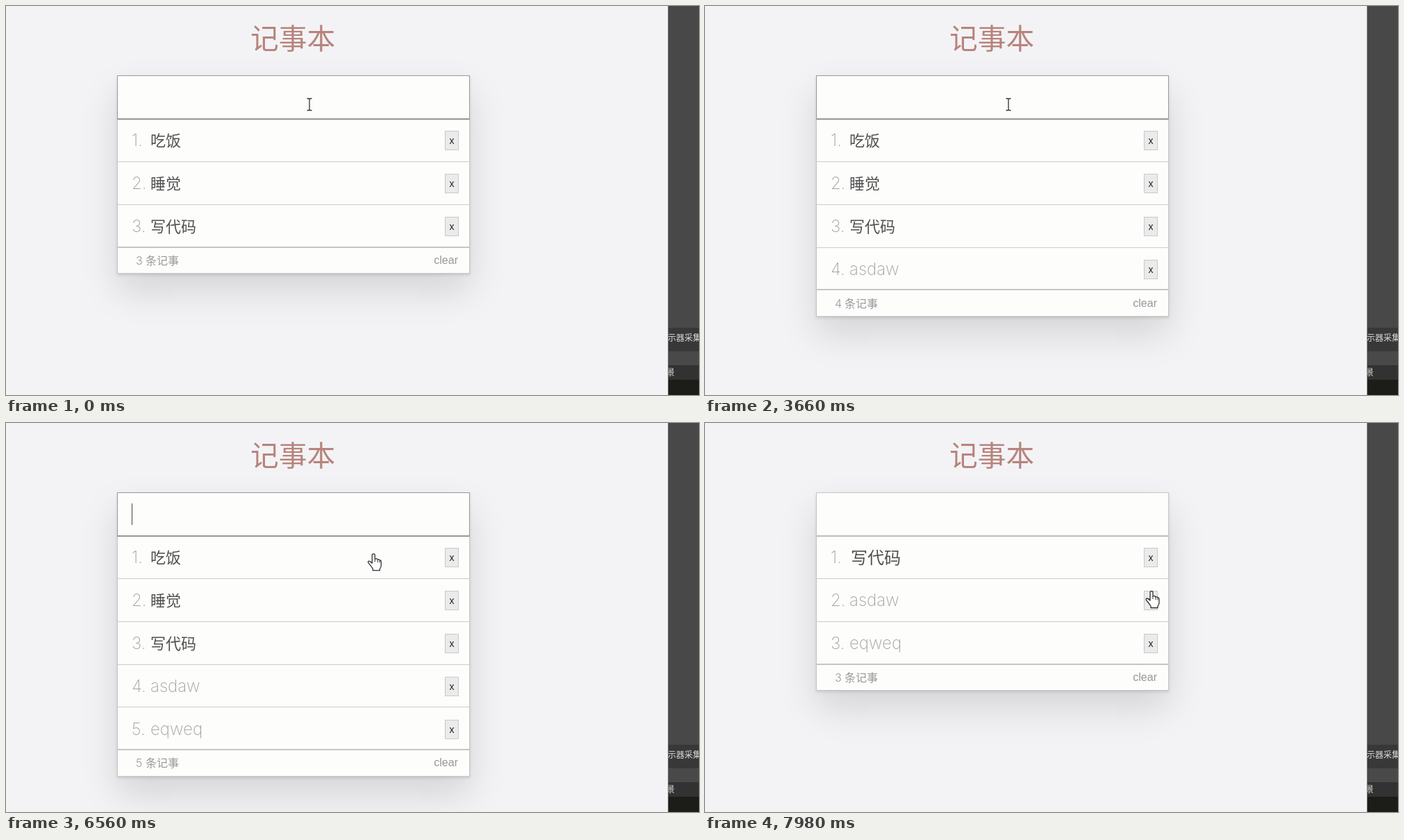
An HTML page that plays this animation: 998x561 px, repeating every 8 s.

```html
<!DOCTYPE html>
<html lang="zh-CN">
<head>
<meta charset="utf-8">
<title>记事本</title>
<style>
html, body { margin: 0; width: 100%; height: 100%; overflow: hidden; background: #f3f3f6; }
body { position: relative; font-family: "Liberation Sans", "Noto Sans CJK SC", "Noto Sans CJK", sans-serif; }
body *, .card * { position: absolute; box-sizing: border-box; white-space: pre; }
.cjk { font-family: "Noto Sans CJK SC", "Noto Sans CJK", sans-serif; font-weight: 100; }
h1 { margin: 0; left: 352px; top: 15px; font-size: 40.7px; line-height: 60px; color: #b8837c; }
.card { left: 160px; top: 100px; width: 508px; background: #fdfdfc; border: 1px solid #c6c6c6;
  box-shadow: 0 2px 4px rgba(0,0,0,.12), 0 25px 50px rgba(0,0,0,.13); }
.input { left: 160px; top: 100px; width: 508px; height: 64px; border: 1px solid; border-bottom-width: 2px;
  padding-left: 20px; font-size: 26px; line-height: 62px; color: #5c5c5c; }
.caret { top: 116px; width: 1px; height: 31px; background: #444; }
.row { left: 161px; width: 506px; height: 61.8px; border-bottom: 1px solid #cbcbd0; line-height: 61px; }
.row.last { border-bottom: 2px solid #c6c6c4; }
.num, .label { font: 200 24px/61px Inter, "Liberation Sans", sans-serif; color: #a4a4a4; }
.num { left: 20px; }
.label { left: 47px; }
.label.cjk { font-family: "Noto Sans CJK SC", "Noto Sans CJK", sans-serif; font-weight: 100; color: #505050; top: -1px; }
.del { left: 471px; top: 17px; width: 20px; height: 28px; background: #ebebeb; border: 1px solid #c9c9c9;
  font-size: 14px; line-height: 26px; text-align: center; color: #222; }
.foot { left: 160px; width: 508px; height: 37px; font-size: 16px; line-height: 36px; color: #999; }
.count { left: 27px; font: 300 16px/36px Inter, "Liberation Sans", sans-serif; }
.unit { left: 41px; font-size: 16px; font-weight: 300; top: -1px; }
.clear { right: 17px; }
.side { left: 953px; top: 0; width: 45px; height: 561px; overflow: hidden; border-left: 1px solid #85857f;
  background: linear-gradient(#484848 464px, #383838 464px 498px, #494949 498px 518px, #323232 518px 539px, #1c1c18 539px); }
.side span { left: -1px; font: 12px/20px "Noto Sans CJK SC", "Noto Sans CJK", sans-serif; color: #ddd; }
svg { left: 0; top: 0; overflow: visible; }
</style>
</head>
<body>
<h1 class="cjk">记事本</h1>
<div class="card"></div>
<div id="rows"></div>
<div class="input"></div>
<div class="caret"></div>
<div class="foot"><span class="count"></span><span class="unit cjk">条记事</span><span class="clear">clear</span></div>
<div class="side"><span style="top:468px">示器采集</span><span style="top:518px;left:-3px">景</span></div>
<svg id="beam" width="10" height="20">
  <path d="M-3.5-8.5H-1L0-7.5 1-8.5H3.5M0-7.5V7.5M-3.5 8.5H-1L0 7.5 1 8.5H3.5" fill="none" stroke="#333" stroke-width="1.3"/>
</svg>
<svg id="hand" width="20" height="26">
  <path d="M-2 1.5Q-2-.5 0-.5T2 1.5V7Q5 5.5 6 8Q8 6.7 9 9Q11 8.3 11 11V16Q11 19 9 21V23.5H-1V21Q-3 18-5 15.5L-7.5 12.5Q-8.5 10.5-6.5 10Q-5 10-2 13Z"
    fill="#fff" stroke="#333" stroke-width="1.3" stroke-linejoin="round"/>
  <path d="M2 7V11M6 8V12M9 9V12.5" stroke="#333" fill="none"/>
</svg>
<script>
const LOOP = 8000, ROW = 61.8, TOP = 163.3, BLINK = 530;
const $ = s => document.querySelector(s);
const card = $('.card'), input = $('.input'), caret = $('.caret'), foot = $('.foot'), count = $('.count');
const beam = $('#beam'), hand = $('#hand');

const blur = 7080;
const typed = [
  { text: 'asdaw', keys: [1720, 1860, 2000, 2160, 2320], enter: 2980 },
  { text: 'eqweq', keys: [4060, 4240, 4400, 4580, 4760], enter: 5500 }
];
const notes = [
  { text: '吃饭', from: 0, to: 7760 },
  { text: '睡觉', from: 0, to: 7140 },
  { text: '写代码', from: 0, to: LOOP, grows: 7140 },
  ...typed.map(w => ({ text: w.text, from: w.enter, to: LOOP }))
];
const resets = [40, ...typed.flatMap(w => [...w.keys, w.enter])];
const path = [[6160, 437, 142], [6560, 529, 189], [6960, 643, 256], [7200, 643, 256],
  [7400, 643, 218], [7560, 643, 190], [7820, 643, 190], [7970, 643, 243], [LOOP, 643, 243]];

const rows = notes.map(() => {
  const row = document.createElement('div');
  row.innerHTML = '<span class="num"></span><span class="label"></span><span class="del">x</span>';
  $('#rows').append(row);
  return row;
});

function pointer(t) {
  if (t <= path[0][0]) return path[0].slice(1);
  const i = path.findIndex(p => p[0] >= t);
  const [t0, x0, y0] = path[i - 1], [t1, x1, y1] = path[i];
  const k = (t - t0) / (t1 - t0);
  return [x0 + (x1 - x0) * k, y0 + (y1 - y0) * k];
}

function drawList(t) {
  const live = notes.filter(n => t >= n.from && t < n.to);
  rows.forEach((row, i) => {
    const note = live[i];
    row.style.display = note ? '' : 'none';
    if (!note) return;
    const [num, label] = row.children;
    const cjk = note.text.charCodeAt(0) > 255, big = t >= note.grows;
    row.className = i === live.length - 1 ? 'row last' : 'row';
    row.style.top = TOP + i * ROW + 'px';
    num.textContent = i + 1 + '.';
    label.textContent = note.text;
    label.className = cjk ? 'label cjk' : 'label';
    label.style.fontSize = cjk ? (big ? '24px' : '22px') : '';
    label.style.left = big ? '49px' : '';
  });
  const bottom = TOP + live.length * ROW;
  card.style.height = bottom - 100 + 37.2 + 'px';
  foot.style.top = bottom + 'px';
  count.textContent = live.length;
}

const pen = document.createElement('canvas').getContext('2d');
pen.font = '26px "Liberation Sans", sans-serif';

function drawInput(t) {
  const word = typed.find(w => t >= w.keys[0] && t < w.enter);
  const text = word ? word.text.slice(0, word.keys.filter(k => k <= t).length) : '';
  const since = t - Math.max(-Infinity, ...resets.filter(r => r <= t));
  const focused = t < blur;
  input.textContent = text;
  input.style.borderColor = focused ? '#999 #999 #969692' : '#c6c6c6 #c6c6c6 #bdbdbb';
  caret.style.left = 181 + Math.round(pen.measureText(text).width) + 'px';
  caret.style.display = focused && t >= resets[0] && since % (2 * BLINK) < BLINK ? '' : 'none';
}

function drawPointer(t) {
  const [x, y] = pointer(t), overList = y > TOP;
  beam.style.display = overList ? 'none' : '';
  hand.style.display = overList ? '' : 'none';
  (overList ? hand : beam).style.transform = `translate(${x}px, ${y}px)`;
}

const start = performance.now();
function frame() {
  const t = (performance.now() - start) % LOOP;
  drawList(t);
  drawInput(t);
  drawPointer(t);
  requestAnimationFrame(frame);
}
frame();
</script>
</body>
</html>
```
